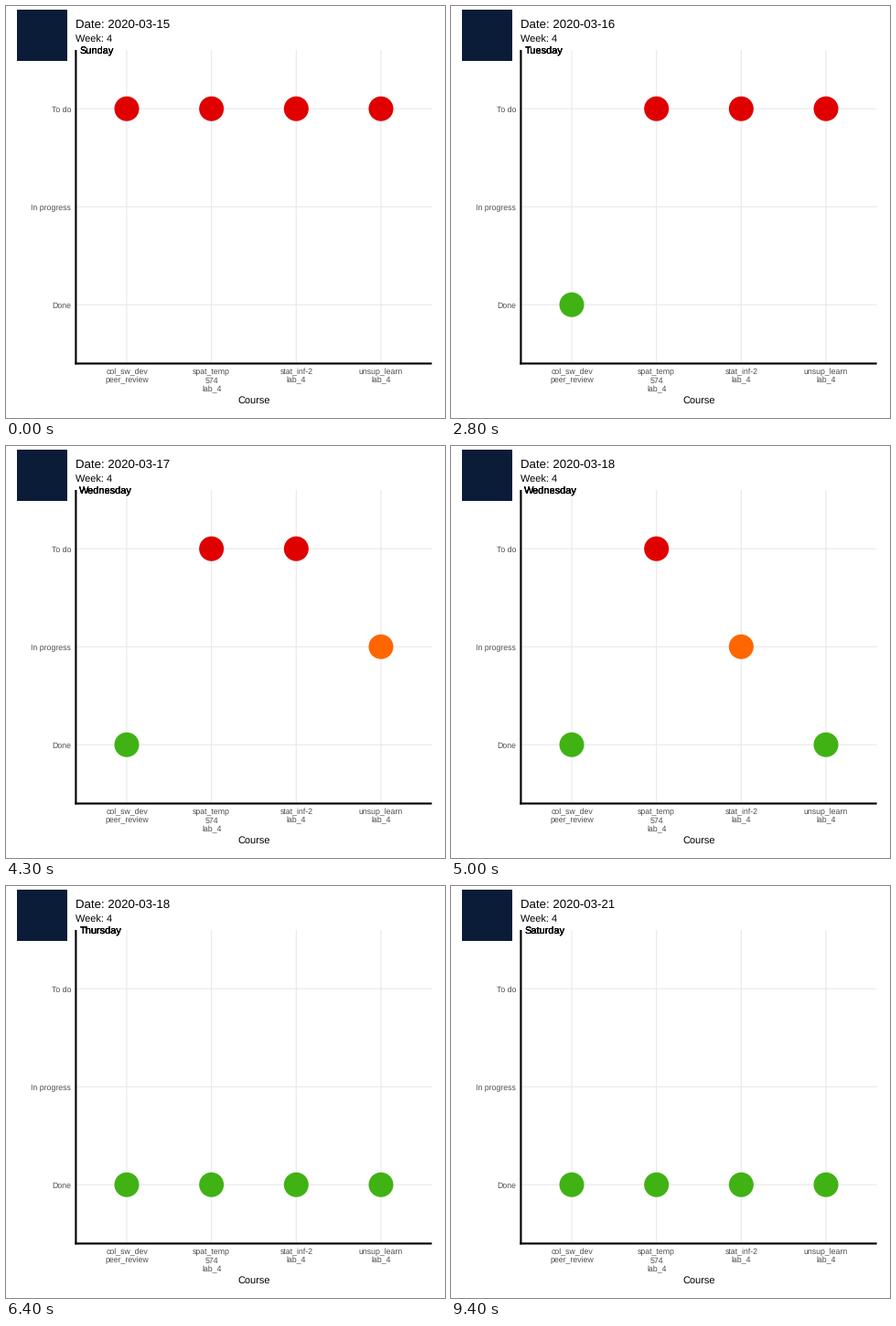
A matplotlib script that plays this animation: 480 by 450 pixels, repeating every 10000 ms.

```python
import matplotlib.pyplot as plt
from matplotlib.animation import FuncAnimation
from matplotlib.patches import Circle, Rectangle

W, H, DPI = 480, 450, 72  # at 72 dpi one point is one pixel
FRAMES, INTERVAL = 100, 100

plt.rcParams["font.family"] = "Liberation Sans"
plt.rcParams["text.hinting"] = "none"

LEFT, RIGHT, TOP, BOTTOM = 76.4, 465.6, 48, 390.5
COL = (RIGHT - LEFT) / 4.2
ROW = (BOTTOM - TOP) / 3.2
XS = [LEFT + COL * (0.6 + i) for i in range(4)]
YS = [TOP + ROW * (0.6 + i) for i in range(3)]

STATUS = ["To do", "In progress", "Done"]
COLORS = ["#e00000", "#ff6600", "#40b214"]
COURSES = [
    ("col_sw_dev", "peer_review"),
    ("spat_temp", "574", "lab_4"),
    ("stat_inf-2", "lab_4"),
    ("unsup_learn", "lab_4"),
]
DAYS = ["Sunday", "Monday", "Tuesday", "Wednesday", "Thursday", "Friday", "Saturday"]

# Frames at which the weekday, the date and each course's status step on
DAY_STEPS = [13, 28, 43, 57, 72, 87]
DATE_STEPS = [20, 35, 50, 65, 80, 94]
STATUS_STEPS = [(20, 20), (64, 64), (50, 64), (35, 50)]


def level(frame, steps):
    return sum(frame >= s for s in steps)


fig = plt.figure(figsize=(W / DPI, H / DPI), dpi=DPI, facecolor="white")
ax = fig.add_axes([0, 0, 1, 1])
ax.set_xlim(0, W)
ax.set_ylim(H, 0)
ax.axis("off")


def label(x, y, text, size, color="black", ha="left"):
    return ax.text(x, y, text, size=size, color=color, ha=ha, va="baseline", zorder=4)


def line(x0, y0, x1, y1, color, width, z):
    ax.plot([x0, x1], [y0, y1], color=color, lw=width, zorder=z,
            solid_capstyle="butt", snap=False)


for x in XS:
    line(x, TOP, x, BOTTOM, "#e8e8e8", 1.07, 1)
for y in YS:
    line(LEFT, y, RIGHT, y, "#e8e8e8", 1.07, 1)
line(LEFT, TOP, LEFT, BOTTOM + 1, "black", 2.13, 3)
line(LEFT - 1, BOTTOM, RIGHT, BOTTOM, "black", 2.13, 3)

for y, name in zip(YS, STATUS):
    label(71.3, y + 3.6, name, 8.8, "#4d4d4d", "right")
for x, rows in zip(XS, COURSES):
    for i, row in enumerate(rows):
        label(x, 402 + 9.5 * i, row, 8.8, "#4d4d4d", "center")
label((LEFT + RIGHT) / 2, 434, "Course", 11, ha="center")
label(76, 40, "Week: 4", 11)

ax.add_patch(Rectangle((11.5, 4), 55.5, 55.5, color="#0b1c38", lw=0))

date = label(76, 24, "", 13.2)
# One weekday label per course, stacked, which thickens the glyphs
days = [label(80.3, 53, "", 11) for _ in COURSES]
dots = [ax.add_patch(Circle((x, YS[0]), 13.5, lw=0, zorder=2)) for x in XS]


def draw(frame):
    date.set_text(f"Date: 2020-03-{15 + level(frame, DATE_STEPS)}")
    for day in days:
        day.set_text(DAYS[level(frame, DAY_STEPS)])
    for dot, x, steps in zip(dots, XS, STATUS_STEPS):
        state = level(frame, steps)
        dot.center = x, YS[state]
        dot.set_facecolor(COLORS[state])
    return [date, *days, *dots]


anim = FuncAnimation(fig, draw, frames=FRAMES, interval=INTERVAL,
                     repeat=True, repeat_delay=0)
plt.show()
```
